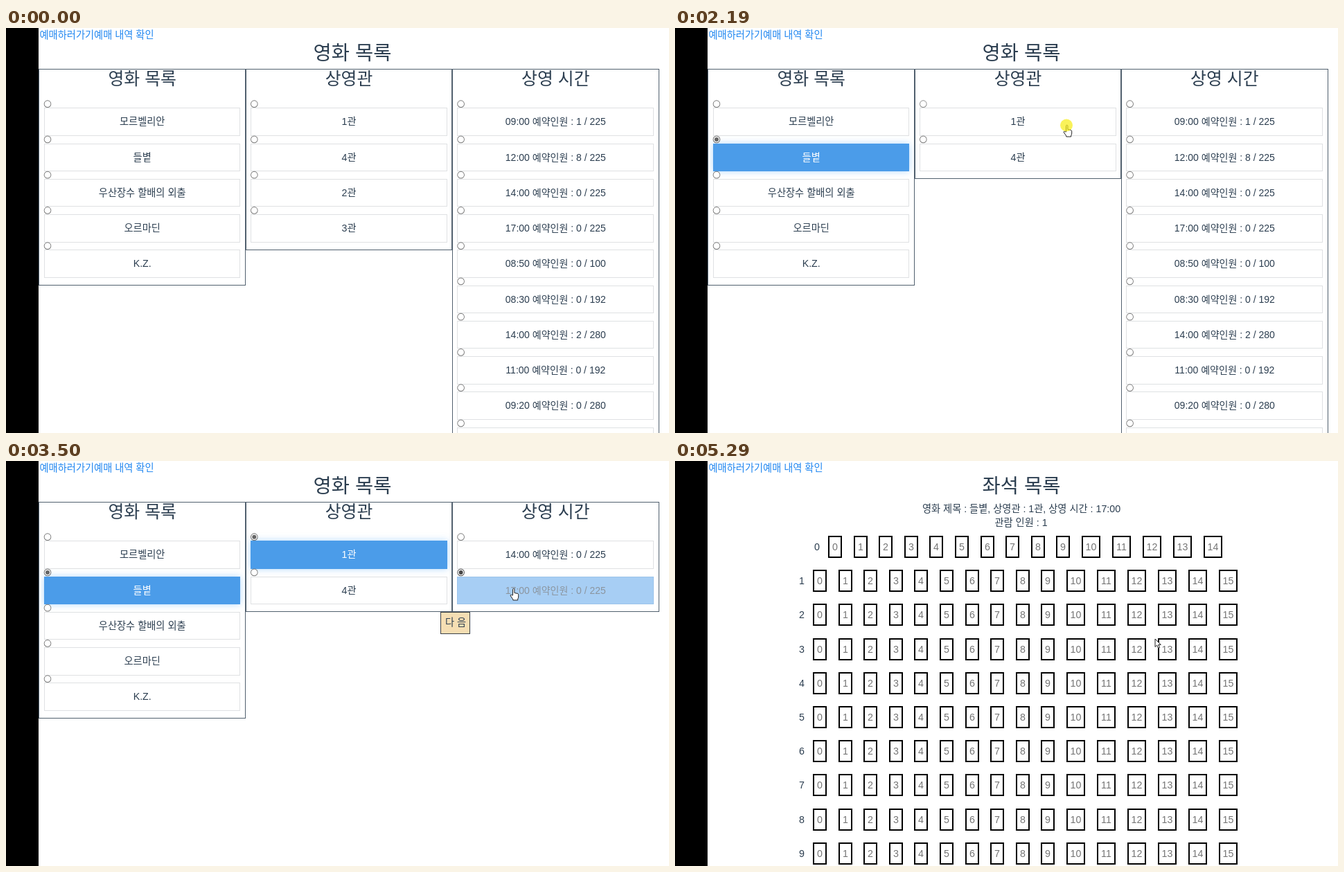
Recreate the animation shown at these times as an HTML page with a canvas. Size 957 by 585 pixels, loop 6.37 s.

```html
<!DOCTYPE html>
<html lang="ko">
<head>
<meta charset="utf-8">
<title>영화 예매</title>
<style>
html, body { margin: 0; width: 100%; height: 100%; overflow: hidden; background: #fff; }
canvas { display: block; }
</style>
</head>
<body>
<canvas width="957" height="585"></canvas>
<script>
const ctx = document.querySelector('canvas').getContext('2d');
const LOOP = 6370, INK = '#2c3e50', EDGE = '#51606e', BLUE = '#4b9ce9', ROW = 51.25, BASE = 14.24;
const PICK_MOVIE = 1380, PICK_ROOM = 2240, PICK_TIME = 3500, PRESS_NEXT = 4980, SEATS = 5130;
const CLICKS = [1230, 2090, 3350, PRESS_NEXT], CLICK_LENGTH = 150;

const PICKED = '들볕';
const movies = ['모르벨리안', PICKED, '우산장수 할배의 외출', '오르마딘', 'K.Z.'];
const rooms = ['1관', '4관', '2관', '3관'];
const times = ['09:00 1 225', '12:00 8 225', '14:00 0 225', '17:00 0 225', '08:50 0 100',
  '08:30 0 192', '14:00 2 280', '11:00 0 192', '09:20 0 280', '13:00 0 280'].map(s => {
  const [start, booked, total] = s.split(' ');
  return `${start} 예약인원 : ${booked} / ${total}`;
});

// Pointer moves: start, end, steps, x, y
const START = [783, 504];
const moves = [
  [140, 750, 8, 210, 140], [930, 1000, 1, 212, 142], [1000, 1060, 1, 216, 182],
  [1380, 1620, 3, 517, 195], [1620, 1860, 3, 566, 141], [2320, 2720, 5, 672, 172],
  [2950, 3100, 2, 733, 185], [3500, 3810, 4, 660, 229], [4040, 4120, 1, 659, 234],
  [5130, 5290, 2, 693, 257]
];
const hand = new Path2D('M-1.5 9V.5a1.2 1.2 0 0 1 2.4 0V5.5l4.6 1q1.2.4 1.2 1.7V11q0 2-1 3.2V16H-1.2V14.8L-4.6 10q-.8-1.3.3-1.7 1-.3 1.6.6z');
const arrow = new Path2D('M0 0V11.5L2.7 9L4.6 13.3L6.6 12.4L4.8 8.3H8.3z');

function pointerAt(t) {
  let [x, y] = START;
  for (const [t0, t1, steps, toX, toY] of moves) {
    if (t < t0) break;
    const k = Math.min(1, Math.floor((t - t0) / (t1 - t0) * steps + 1e-6) / steps);
    const e = k * k * (3 - 2 * k);
    x += (toX - x) * e;
    y += (toY - y) * e;
  }
  return { x, y };
}

function mix(from, to, p) {
  return `rgb(${from.map((c, i) => Math.round(c + (to[i] - c) * p))})`;
}

function text(s, x, y, size = BASE, color = INK, align = 'center') {
  ctx.font = `300 ${size}px "Liberation Sans", "Noto Sans CJK KR", "Noto Sans CJK", sans-serif`;
  ctx.textAlign = align;
  ctx.fillStyle = color;
  ctx.fillText(s, x, y);
}

function box(x, y, w, h, stroke, width = 1) {
  ctx.strokeStyle = stroke;
  ctx.lineWidth = width;
  ctx.strokeRect(x + width / 2, y + width / 2, w - width, h - width);
}

function disc(x, y, r, color) {
  ctx.beginPath();
  ctx.arc(x, y, r, 0, 7);
  ctx.fillStyle = color;
  ctx.fill();
}

function radio(x, y, color, checked) {
  disc(x, y, 5.3, color);
  disc(x, y, 4.4, '#fff');
  if (checked) disc(x, y, 3, color);
}

// Returns whether the pointer is over one of the items.
function column(i, title, items, picked, since, pointer, pressed) {
  const left = [47, 346, 644][i], right = [346, 644, 943][i];
  const itemLeft = 54.8 + 298.3 * i, mid = itemLeft + 141.9;
  const x = Math.round(itemLeft), w = Math.round(itemLeft + 283.6) - x;
  let over = false;
  box(left, 59, right - left, Math.floor(ROW * items.length) + 57, EDGE);
  text(title, mid, 81.7, 24.9);
  items.forEach((label, n) => {
    const top = 115.25 + ROW * n, on = n === picked && since >= 0;
    const y = Math.round(top), h = Math.round(top + 40.6) - y;
    const hover = pointer && pointer.x > x && pointer.x < x + w && pointer.y > y && pointer.y < y + h;
    const fill = !on ? 0 : since < 80 ? .49 : 1;
    const ink = !on ? 0 : since < 80 ? .45 : since < 320 ? .88 : 1;
    over = over || hover;
    if (on) {
      ctx.save();
      if (fill === 1) {
        ctx.shadowColor = 'rgba(102, 179, 251, .5)';
        ctx.shadowBlur = 9;
      }
      ctx.fillStyle = mix([255, 255, 255], [75, 156, 233], fill);
      ctx.fillRect(x, y, w, h);
      ctx.restore();
    }
    box(x, y, w, h, on ? (fill < 1 ? '#9cc4ea' : BLUE) : '#dfe1e3');
    text(label, mid, top + 25, i === 2 ? 14 : BASE, mix([44, 62, 80], [255, 255, 255], ink));
    const tone = hover ? (pressed ? '#8a8a8a' : '#484848') : on ? '#666' : '#767676';
    radio(itemLeft + 5.2, top - 5.6, tone, on);
  });
  return over;
}

function nextButton(focused) {
  ctx.fillStyle = '#f5deb3';
  ctx.fillRect(628, 218, 41, 31);
  if (focused) {
    ctx.beginPath();
    ctx.roundRect(628, 218, 41, 31, 2.5);
    ctx.strokeStyle = '#101010';
    ctx.lineWidth = 2;
    ctx.stroke();
  } else box(627, 218, 43, 32, '#3a4148');
  text('다 음', 649, 238.3);
}

function bookingPage(t, pointer, pressed) {
  text('영화 목록', 500, 45.5, 28.5);
  const lists = [
    ['영화 목록', movies, 1, PICK_MOVIE],
    ['상영관', t < PICK_MOVIE ? rooms : rooms.slice(0, 2), 0, PICK_ROOM],
    ['상영 시간', t < PICK_ROOM ? times : times.slice(2, 4), 1, PICK_TIME]
  ];
  let over = false;
  lists.forEach(([title, items, picked, at], i) => {
    over = column(i, title, items, picked, t - at, pointer, pressed) || over;
  });
  if (t >= PICK_ROOM) {
    nextButton(t >= PRESS_NEXT);
    over = over || pointer.x > 627 && pointer.x < 670 && pointer.y > 218 && pointer.y < 250;
  }
  return over;
}

function seatPage() {
  text('좌석 목록', 500, 45.5, 28.5);
  text(`영화 제목 : ${PICKED}, 상영관 : 1관, 상영 시간 : 17:00`, 500, 74);
  text('관람 인원 : 1', 499.5, 94);
  for (let r = 0; r < 10; r++) {
    const shift = r ? 0 : 22, y = 108 + 49.2 * r;
    text(r, 183 + shift, y + 21);
    for (let s = 0; s < (r ? 16 : 15); s++) {
      const wide = s > 9, w = wide ? 27 : 20;
      const x = Math.round(199 + shift + (wide ? 366 + 43.9 * (s - 10) : 36.6 * s));
      box(x, Math.round(y), w, 32, '#000', 2);
      text(s, x + w / 2, y + 21, BASE, '#757575');
    }
  }
}

function drawPointer({ x, y }, isHand) {
  const shape = isHand ? hand : arrow;
  ctx.save();
  ctx.translate(x, y);
  ctx.lineWidth = 1;
  ctx.lineJoin = 'round';
  ctx.strokeStyle = '#222';
  ctx.fillStyle = '#fff';
  ctx.fill(shape);
  ctx.stroke(shape);
  ctx.restore();
}

function draw(now) {
  const t = now % LOOP;
  const pointer = t < 140 ? null : pointerAt(t);
  const pressed = CLICKS.some(c => t >= c && t < c + CLICK_LENGTH);
  let over = false;
  ctx.fillStyle = '#fff';
  ctx.fillRect(0, 0, 957, 585);
  ctx.fillStyle = '#000';
  ctx.fillRect(0, 0, 47, 585);
  text('예매하러가기예매 내역 확인', 48.5, 15.3, BASE, '#1f86f0', 'left');
  if (t < SEATS) over = bookingPage(t, pointer, pressed);
  else seatPage();
  if (pointer) drawPointer(pointer, over);
  if (pressed) disc(pointer.x - 1, pointer.y - .5, 9, 'rgba(246, 236, 20, .7)');
  requestAnimationFrame(draw);
}
requestAnimationFrame(draw);
</script>
</body>
</html>
```
